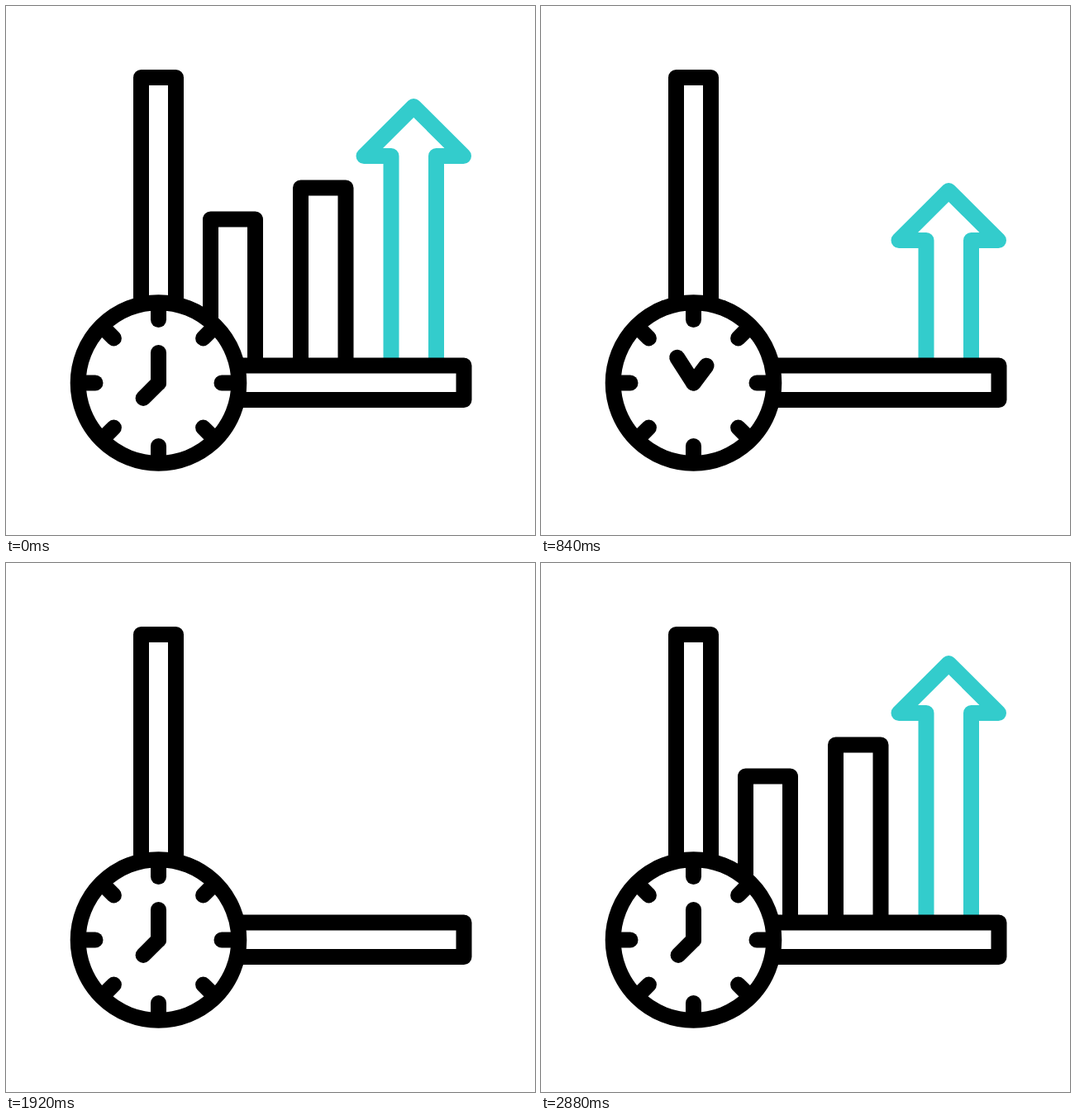
Animation of 640 by 640 pixels, one loop 3.16 s. Source, as an HTML page:

```html
<!DOCTYPE html>
<html lang="en">
<head>
<meta charset="utf-8">
<title>Growth over time</title>
<style>
  html, body { margin: 0; width: 100%; height: 100%; overflow: hidden; background: #fff; }
  svg { display: block; width: 100%; height: 100%; }
</style>
</head>
<body>
<svg viewBox="0 0 640 640" fill="none" stroke="#000" stroke-width="19" stroke-linecap="round" stroke-linejoin="round">
  <clipPath id="above"><rect width="640" height="435"/></clipPath>
  <g clip-path="url(#above)">
    <path id="low" d="M247.5 900V258H301.5V900"/>
    <path id="mid" d="M356.5 900V220H411V900"/>
    <path id="arrow" stroke="#3cc" d="M466 900V181.5H433L493.2 121.5L553.5 181.5H520.5V900"/>
  </g>
  <path d="M163.5 400V86.5H205.5V400"/>
  <path d="M240 435H554V476.5H240"/>
  <g transform="translate(184.5 456)">
    <circle r="97.3" fill="#fff"/>
    <g id="ticks"></g>
    <path id="minute" d="M0 0V-36.5"/>
    <path id="hour" d="M0 0V-26"/>
  </g>
</svg>
<script>
const LOOP = 3160, STEP = 40, TURN = 1760;
const DROP = 332, FALL = 833;
const $ = id => document.getElementById(id);

// Each part sinks behind the axis, then rises again.
const parts = [
  { el: $('low'), fall: 0, rise: 1525, top: 2370 },
  { el: $('mid'), fall: 283, rise: 1670, top: 2620 },
  { el: $('arrow'), fall: 533, rise: 1824, top: 2880 }
];

$('ticks').innerHTML = Array.from({ length: 8 }, (_, i) =>
  `<path d="M0 -95V-76.5" transform="rotate(${i * 45})"/>`).join('');

function ease(t, from, to) {
  const p = Math.min(1, Math.max(0, (t - from) / (to - from)));
  return p * p * (3 - 2 * p);
}

function draw(t) {
  for (const { el, fall, rise, top } of parts) {
    const y = DROP * (ease(t, fall, fall + FALL) - ease(t, rise, top));
    el.setAttribute('transform', `translate(0 ${y.toFixed(2)})`);
  }
  const turn = 360 * Math.min(1, t / TURN);
  $('minute').setAttribute('transform', `rotate(${turn * 4})`);
  $('hour').setAttribute('transform', `rotate(${225 + turn})`);
}

const start = performance.now();
function tick() {
  const t = (performance.now() - start) % LOOP;
  draw(Math.floor(t / STEP) * STEP);
  requestAnimationFrame(tick);
}
tick();
</script>
</body>
</html>
```
